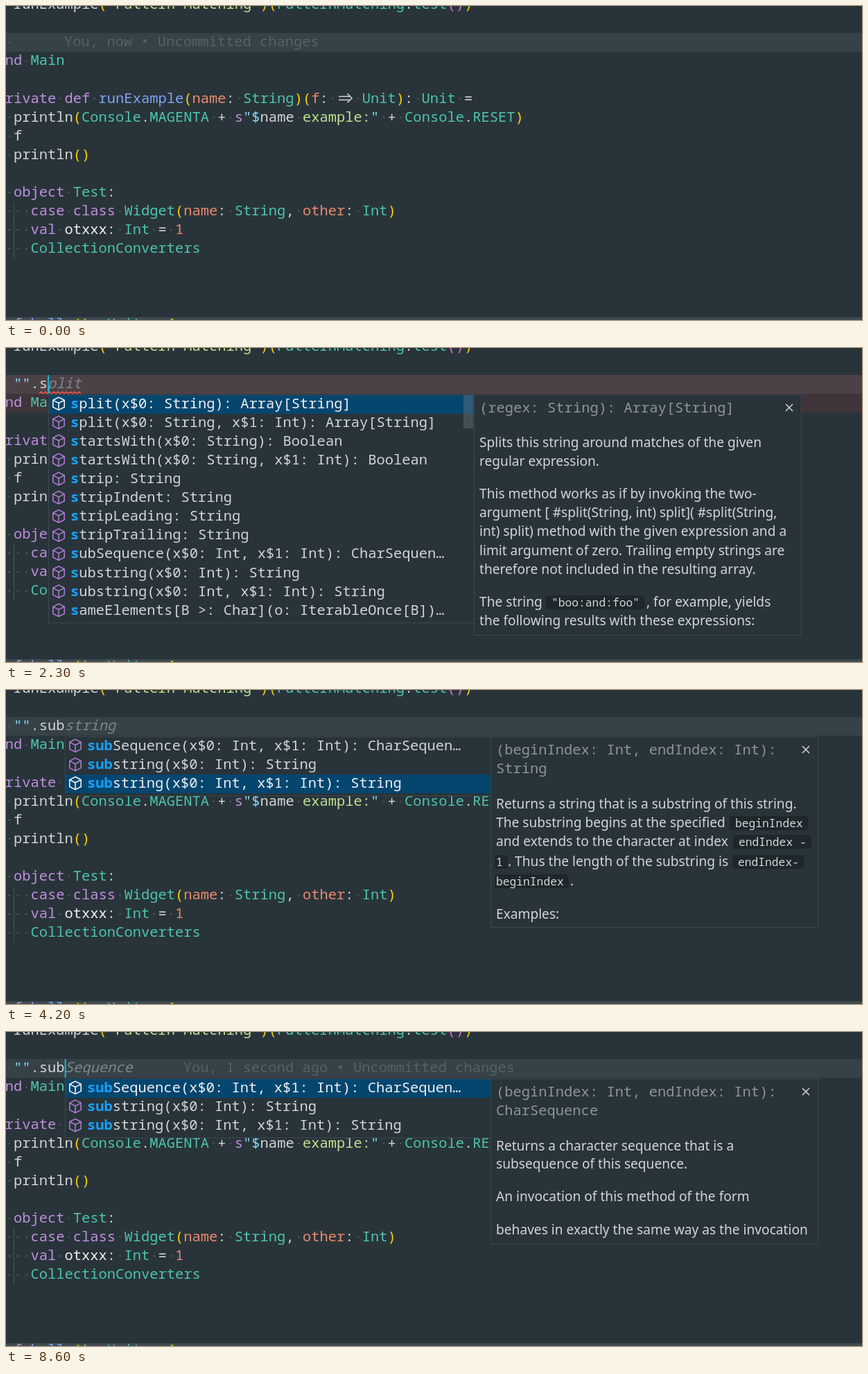
These frames come from a looping animation (1235x453 px, 8700 ms). An HTML page:

```html
<!DOCTYPE html>
<html lang="en">
<head>
<meta charset="utf-8">
<title>Code completion</title>
<style>
html, body { margin: 0; width: 100%; height: 100%; overflow: hidden; background: #29343a; }
svg { display: block; }
text { white-space: pre; font: 20.46px "Noto Sans Mono", "DejaVu Sans Mono", monospace; fill: #d3d5d6; }
.sans { font: 19.15px "Noto Sans", "Open Sans", sans-serif; }
.chip { font-size: 16.3px; }
.k { fill: #c08fdf; } .c { fill: #4cc5ad; } .f { fill: #7ea5f0; } .o { fill: #ec8a6c; }
.s { fill: #c0e290; } .q { fill: #89d9f8; } .g { fill: #fad10c; } .p { fill: #d272cf; }
.w { fill: #eef1f2; } .m { fill: #18a0f8; font-weight: bold; }
.head { fill: #8d9599; } .blame { fill: #566167; }
.ghost { fill: #7b868b; font-style: italic; }
.panel { fill: #29343a; stroke: #3c484e; }
.line { fill: none; stroke-width: 1.5; }
</style>
</head>
<body>
<svg width="1235" height="453" viewBox="0 0 1235 453">
  <g id="under"></g>
  <g id="code"></g>
  <g id="over"></g>
</svg>
<script>
const CHAR = 12.276, LEFT = -1.3, LINE = 27.08, LOOP = 8700;
const colX = col => LEFT + col * CHAR;
const rowBase = row => 4.2 + row * LINE;
const esc = s => s.replace(/&/g, '&amp;').replace(/</g, '&lt;').replace(/>/g, '&gt;');
const text = (x, y, s, cls = '') => `<text x="${x}" y="${y}" class="${cls}">${esc(s)}</text>`;
const rect = (x, y, w, h, fill, rx = 0) =>
  `<rect x="${x}" y="${y}" width="${w}" height="${h}" rx="${rx}" fill="${fill}"/>`;
const panel = (x, y, w, h) => `<rect class="panel" x="${x + .5}" y="${y + .5}" width="${w - 1}" height="${h - 1}"/>`;
const line = (d, color, move = '0 0') => `<path class="line" d="${d}" stroke="${color}" transform="translate(${move})"/>`;

// A code row is a list of "class|text" tokens; spaces get a faint dot.
function codeRow(row, ...tokens) {
  const parts = tokens.map(t => [t[0], t.slice(2)]);
  const spans = parts.map(([cls, s]) => `<tspan class="${cls}">${esc(s)}</tspan>`).join('');
  const dots = [...parts.map(p => p[1]).join('')].map((ch, col) => ch === ' '
    ? `<circle cx="${colX(col + .5)}" cy="${rowBase(row) - 6}" r="1.3" fill="#4c585e"/>` : '').join('');
  return `<text x="${LEFT}" y="${rowBase(row)}">${spans}</text>${dots}`;
}

const code = [
  codeRow(0, 't| runExample', 'g|(', 'q|"', 's|Pattern Matching', 'q|"', 'g|)(', 'c|PatternMatching',
    't|.', 'c|test', 'p|()', 'g|)'),
  codeRow(3, 'k|nd ', 'c|Main'),
  codeRow(5, 'k|rivate def ', 'f|runExample', 'g|(', 'o|name', 't|: ', 'c|String', 'g|)(', 'o|f',
    't|: \u00a0\u00a0 ', 'c|Unit', 'g|)', 't|: ', 'c|Unit', 't| ='),
  line('M480 130.5H496M480 135.5H496M492.5 126.5L499 133L492.5 139.5', '#d3d5d6'),
  codeRow(6, 't| println', 'g|(', 'c|Console', 't|.', 'c|MAGENTA', 't| + ', 'k|s', 'q|"$', 't|name',
    's| example:', 'q|"', 't| + ', 'c|Console', 't|.', 'c|RESET', 'g|)'),
  codeRow(7, 't| f'),
  codeRow(8, 't| println', 'g|()'),
  codeRow(10, 'k| object ', 'c|Test', 't|:'),
  codeRow(11, 'k|   case class ', 'c|Widget', 'g|(', 'o|name', 't|: ', 'c|String', 't|, ', 'o|other',
    't|: ', 'c|Int', 'g|)'),
  codeRow(12, 'k|   val ', 'w|otxxx', 't|: ', 'c|Int', 't| = ', 'o|1'),
  codeRow(13, 'c|   CollectionConverters'),
  rect(11, 283, 1, 81, '#48545a'),
  rect(0, 449, 1235, 4, '#3f4b51'),
  codeRow(17, 'k|ef ', 'f|hello', 'g|()', 't|: ', 'c|Unit', 't| = ', 'g|{')
].join('');

const subItems = ['subSequence(x$0: Int, x$1: Int): CharSequen…', 'substring(x$0: Int): String',
  'substring(x$0: Int, x$1: Int): String'];
const allItems = ['split(x$0: String): Array[String]', 'split(x$0: String, x$1: Int): Array[String]',
  'startsWith(x$0: String): Boolean', 'startsWith(x$0: String, x$1: Int): Boolean', 'strip: String',
  'stripIndent: String', 'stripLeading: String', 'stripTrailing: String', ...subItems,
  'sameElements[B >: Char](o: IterableOnce[B])…'];

// Body entries: [x offset, baseline, text, is code chip].
const docs = {
  split: { height: 348, head: ['(regex: String): Array[String]'], body: [
    [8, 143, 'Splits this string around matches of the given'],
    [8, 170, 'regular expression.'],
    [8, 217, 'This method works as if by invoking the two-'],
    [8, 244, 'argument [ #split(String, int) split]( #split(String,'],
    [8, 271, 'int) split) method with the given expression and a'],
    [8, 299, 'limit argument of zero. Trailing empty strings are'],
    [8, 326, 'therefore not included in the resulting array.'],
    [8, 373, 'The string'], [112, 373, '"boo:and:foo"', true],
    [249, 373, ', for example, yields'],
    [8, 400, 'the following results with these expressions:']] },
  sequence: { height: 239, head: ['(beginIndex: Int, endIndex: Int):', 'CharSequence'], body: [
    [8, 171, 'Returns a character sequence that is a'],
    [8, 197, 'subsequence of this sequence.'],
    [8, 244, 'An invocation of this method of the form'],
    [8, 292, 'behaves in exactly the same way as the invocation']] },
  from: { height: 172, head: ['(beginIndex: Int): String'], body: [
    [8, 143, 'Returns a string that is a substring of this string.'],
    [8, 171, 'The substring begins with the character at the'],
    [8, 197, 'specified index and extends to the end of this'],
    [8, 225, 'string. Examples:']] },
  range: { height: 276, head: ['(beginIndex: Int, endIndex: Int):', 'String'], body: [
    [8, 171, 'Returns a string that is a substring of this string.'],
    [8, 198, 'The substring begins at the specified'], [353, 198, 'beginIndex', true],
    [8, 225, 'and extends to the character at index'], [358, 225, 'endIndex -', true],
    [8, 254, '1', true], [25, 254, '. Thus the length of the substring is'], [357, 254, 'endIndex-', true],
    [8, 282, 'beginIndex', true], [115, 282, '.'],
    [8, 330, 'Examples:']] }
};

function drawList(x, items, selected, matched) {
  let out = panel(x, 67, 615, items.length * LINE + 5);
  items.forEach((item, i) => {
    const on = i === selected, base = 86.8 + i * LINE;
    if (on) out += rect(x + 1, Math.floor(68 + i * LINE), 613, 27, '#05466f');
    out += line('M0-9.2L8.2-5V5L0 9.2L-8.2 5V-5ZM-8.2-5L0-.8L8.2-5M0-.8V9.2', on ? '#fff' : '#b180d7',
      `${x + 15} ${base - 6.5}`);
    out += `<text x="${x + 32}" y="${base}" class="${on ? 'w' : ''}"><tspan class="m">` +
      `${item.slice(0, matched)}</tspan>${esc(item.slice(matched))}</text>`;
  });
  if (items.length > 3) out += rect(x + 599, 68, 14, 48, 'rgba(110,122,129,.4)');
  return out;
}

function drawDoc(x, { height, head, body }) {
  let out = panel(x, 67, 473, height);
  head.forEach((s, i) => out += text(x + 8, 93 + i * 27, s, 'head'));
  out += line('M-5-5L5 5M5-5L-5 5', '#d3d5d6', `${x + 455} 86`);
  for (const [dx, y, s, chip] of body) {
    const pad = dx === 8 ? 2 : 8;
    if (chip) out += rect(x + dx - pad, y - 16, s.length * 9.78 + pad + 7, 20, '#1e272b', 3);
    out += text(x + dx, y, s, chip ? 'chip' : 'sans');
  }
  return out;
}

// Each step holds from its time on and overrides what came before.
const steps = [
  { at: 0, typed: '', caret: 0, blame: 'You, now • Uncommitted changes' },
  { at: 600, typed: '""', caret: 2 },
  { at: 700, blame: '' },
  { at: 900, bulb: true },
  { at: 1100, caret: 0 },
  { at: 1300, caret: 3 },
  { at: 1700, typed: '"".', caret: 4 },
  { at: 1800, error: true },
  { at: 2000, bulb: false },
  { at: 2200, typed: '"".s', caret: 5 },
  { at: 2300, ghost: 'plit', items: allItems, pick: 0, doc: 'split' },
  { at: 2400, typed: '"".su', caret: 6, ghost: 'bSequence', items: subItems, error: false },
  { at: 2600, typed: '"".sub', caret: 7, ghost: 'Sequence', doc: 'sequence' },
  { at: 3500, ghost: 'string', pick: 1, doc: 'from' },
  { at: 4200, pick: 2, doc: 'range' },
  { at: 5300, pick: 1, doc: 'from' },
  { at: 6000, ghost: 'Sequence', pick: 0, doc: 'sequence' },
  { at: 8000, blame: 'You, 1 second ago • Uncommitted changes' }
];
const blinks = [3100, 3600, 4100, 4600, 5200, 5600, 6200, 6600, 7100, 7600, 8200, 8600];

function stateAt(t) {
  const state = Object.assign({}, ...steps.filter(s => s.at <= t));
  if (blinks.filter(b => b <= t).length % 2) state.caret = 0;
  return state;
}

const [under, codeLayer, over] = ['under', 'code', 'over'].map(id => document.getElementById(id));
codeLayer.innerHTML = code;
let shown = '';

function render(t) {
  const s = stateAt(t), { typed, ghost = '' } = s;
  const key = JSON.stringify(s);
  if (key === shown) return;
  shown = key;

  under.innerHTML = rect(0, 39, 1235, 27, s.error ? '#4b4247' : '#364248') +
    (s.error ? rect(0, 66, 1235, 27, '#3e3439') : '');

  const end = 1 + typed.length, base = rowBase(2);
  let out = codeRow(2, 't| ', 'q|' + typed.slice(0, 2), 't|' + typed.slice(2));
  if (ghost) out += text(colX(end), base, ghost, 'ghost');
  if (s.blame) out += text(colX(end + ghost.length) + 73, base, s.blame, 'blame');
  if (s.error && s.items) out += line('M48 66' + 'l3-3l3 3'.repeat(10), '#e8564f');
  if (s.bulb) out += '<circle cx="-1.5" cy="21" r="5.5" fill="none" stroke="#f7bc2f" stroke-width="3"/>' +
    rect(0, 30, 2, 2, '#f7bc2f');
  if (s.items) {
    const x = Math.round(colX(end) + .8);
    out += drawList(x, s.items, s.pick, typed.length - 3) + drawDoc(x + 614, docs[s.doc]);
  }
  if (s.caret) out += rect(colX(s.caret), 39, 2, 27, '#20b4d0');
  over.innerHTML = out;
}

const start = performance.now();
function frame() {
  render((performance.now() - start) % LOOP);
  requestAnimationFrame(frame);
}
frame();
</script>
</body>
</html>
```
